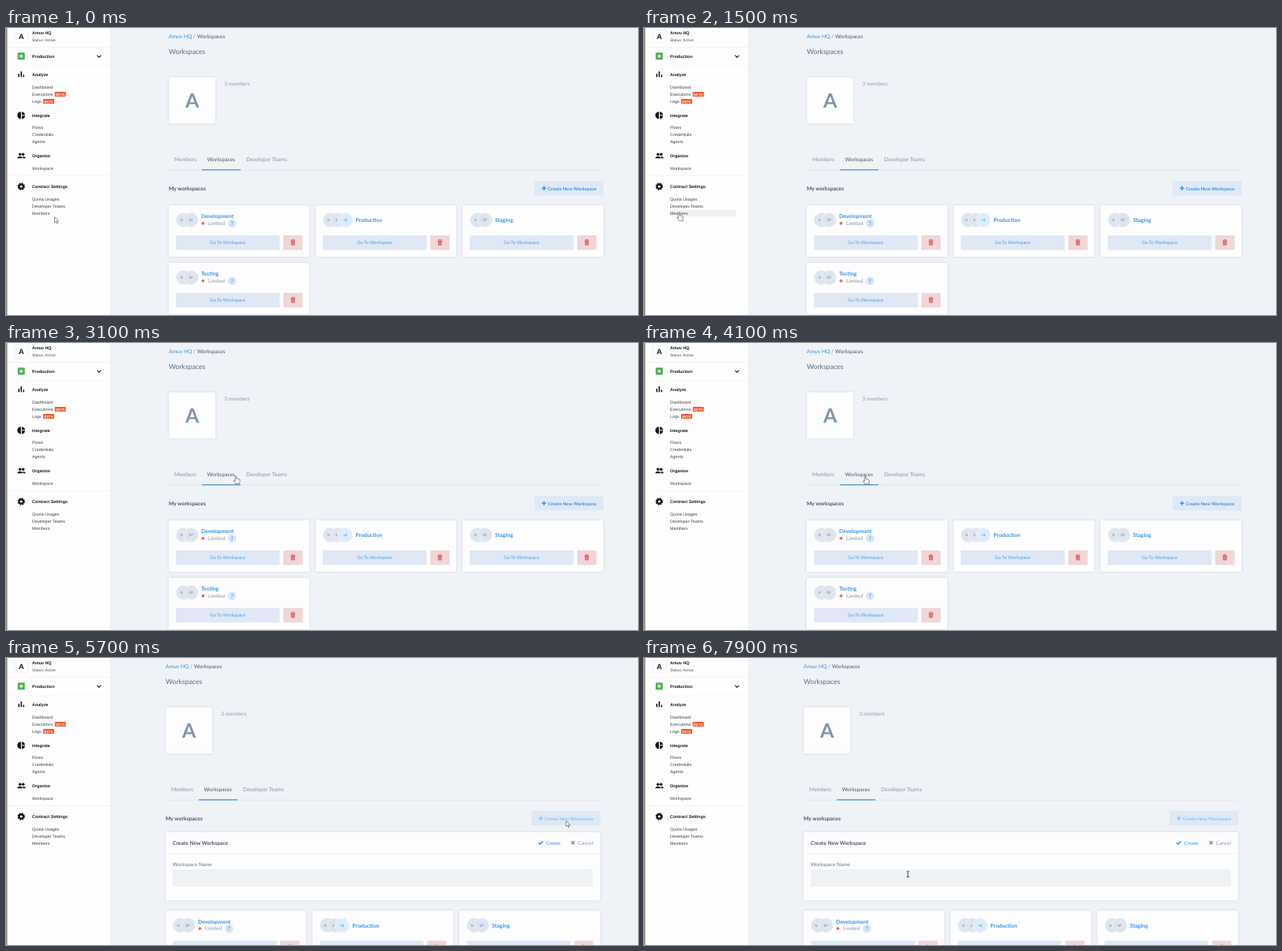
Recreate the animation shown at these times as an HTML page. Size 800 by 364 pixels, loop 8 s.

```html
<!DOCTYPE html>
<html lang="en">
<head>
<meta charset="utf-8">
<title>Workspaces</title>
<style>
  html, body { margin: 0; width: 100%; height: 100%; overflow: hidden; background: #eff2f6; }
  svg { display: block; width: 100vw; height: 100vh; }
  text { font-family: Lato, "Open Sans", sans-serif; text-rendering: geometricPrecision; white-space: pre; }
  .side text { font-family: "Liberation Sans", Arial, sans-serif; }
  .card { filter: drop-shadow(0 .6px 1.6px rgba(70, 90, 120, .17)); }
</style>
</head>
<body>
<svg id="stage" viewBox="0 0 800 364" preserveAspectRatio="none"></svg>
<script>
const BLUE = '#3493ea', SLATE = '#8795aa', DARK = '#4c5667';

const text = (x, y, s, size, fill, bold, anchor = 'start') =>
  `<text x="${x}" y="${y}" font-size="${size}" fill="${fill}" font-weight="${bold ? 700 : 400}" text-anchor="${anchor}">${s}</text>`;
const rect = (x, y, w, h, fill, r = 0, extra = '') =>
  `<rect x="${x}" y="${y}" width="${w}" height="${h}" rx="${r}" fill="${fill}" ${extra}/>`;
const circle = (x, y, r, fill, extra = '') => `<circle cx="${x}" cy="${y}" r="${r}" fill="${fill}" ${extra}/>`;
const path = (d, fill, extra = '') => `<path d="${d}" fill="${fill}" ${extra}/>`;
const line = (d, color, w) => path(d, 'none', `stroke="${color}" stroke-width="${w}"`);
const group = (x, y, body, extra = '') => `<g transform="translate(${x} ${y})" ${extra}>${body}</g>`;

// Sidebar
const badge = (x, y) => rect(x, y, 14, 6, '#f2592f', .8) + text(x + 7, y + 4.6, 'BETA', 4.3, '#ffe3da', true, 'middle');

function sidebar() {
  const heads = [[7.9, 'Amuv HQ'], [37.6, 'Production'], [60.6, 'Analyze'], [112.6, 'Integrate'],
    [164.4, 'Organize'], [203, 'Contract Settings']];
  const items = [[76.5, 'Dashboard'], [85.7, 'Executions'], [94.7, 'Logs'], [128.4, 'Flows'],
    [137.4, 'Credentials'], [146.4, 'Agents'], [180.2, 'Workspace'], [218.9, 'Quota Usages'],
    [227.9, 'Developer Teams'], [236.9, 'Members']];
  const icons =
    rect(12, 3, 15, 15, '#fff', 1.5, 'class="card"') + text(19.5, 13.7, 'A', 9.4, '#15181d', true, 'middle') +
    rect(14.8, 31.2, 9, 9, '#4fae55', .8) + circle(19.3, 35.7, 2.3, '#a9dcab') + circle(19.3, 35.7, 1, '#fff') +
    line('M115.3 34.6L117.8 37.1L120.3 34.6', '#222', 1.2) +
    line('M16.3 62.3V58M19.3 62.3V55M22.3 62.3V59.6', '#111', 1.5) +
    path('M18.9 106.2A4.6 4.6 0 0 0 18.9 115.4ZM20 106.2V110.3H24.1A4.6 4.6 0 0 0 20 106.2ZM20 111.3H24.1A4.6 4.6 0 0 1 20 115.4Z', '#111') +
    circle(17.7, 160.3, 1.8, '#111') + circle(21.7, 160.3, 1.8, '#111') +
    path('M14.3 165.3Q14.5 162.8 17.7 162.8T21 165.3ZM21.7 165.3Q21.8 163.8 20.9 162.9Q24.6 162.7 24.8 165.3Z', '#111') +
    circle(19.3, 201, 2.7, 'none', 'stroke="#111" stroke-width="2.2"') +
    circle(19.3, 201, 4, 'none', 'stroke="#111" stroke-width="1.4" stroke-dasharray="1.8 1.342"');
  return '<g class="side">' + rect(0, 0, 132, 364, '#fefefe') + rect(0, 0, 1.6, 364, '#8d887e') +
    line('M132.2 0V364', '#e6eaef', .6) +
    line('M1.6 24.5H132M1.6 48H132M1.6 187.5H132', '#eef0f3', .7) +
    rect(33, 230.8, 83.5, 8.4, '#f0f0f1', 0, 'id="row"') + icons +
    heads.map(([y, s]) => text(33, y, s, 5.4, '#17191d', true)).join('') +
    text(33, 16.8, 'Status: Active', 4.9, '#4b4e54') +
    items.map(([y, s]) => text(33, y, s, 5.4, '#404349')).join('') +
    badge(61.7, 81) + badge(47, 90) + '</g>';
}

// Workspace cards
const avatar = (x, s, dx = 0, fill = '#dfe5ee', ink = '#8fa0b7') =>
  circle(x, 18.5, 9.2, fill, 'stroke="#f4f6f9" stroke-width=".5"') + text(x + dx, 20.1, s, 4.5, ink, true, 'middle');

const trash = path('M-3-3.1H-1.2L-.8-3.8H.8L1.2-3.1H3V-2.3H-3ZM-2.6-1.8H2.6L2.2 3.8H-2.2Z', '#d9595d') +
  line('M-1-.8V2.8M0-.8V2.8M1-.8V2.8', '#f0cfd0', .4);

function card(x, y, name, size, { limited, extra } = {}) {
  let body = rect(0, 0, 178, 65, '#fdfdfe', 1.5, 'class="card"') + avatar(18.5, 'N', -2.2);
  body += extra
    ? avatar(28.2, 'E', -1.6) + avatar(37.6, '+1', 0, '#dcecfc', BLUE)
    : avatar(28.2, 'EP');
  body += text(limited ? 41 : extra ? 50.5 : 41, limited ? 16.2 : 21, name, size, BLUE, true);
  if (limited) {
    body += circle(43.4, 22.7, 1.9, '#ee6d58') + text(50, 24.8, 'Limited', 6.5, SLATE) +
      circle(80.2, 22.7, 5.2, '#d2e6fb') + text(80.2, 24.9, '?', 6.2, BLUE, true, 'middle');
  }
  body += rect(9, 38, 131.5, 18.4, '#dfe8f4', 1.2) + text(74.7, 49.2, 'Go To Workspace', 5.85, '#4b9fea', false, 'middle') +
    rect(145, 38, 24.5, 18.4, '#f0d6d7', 1.2) + group(157.2, 46.8, trash);
  return group(x, y, body);
}

function form() {
  return '<g id="form">' + rect(206, 221, 550, 86.5, '#fdfdfe', 1.5, 'class="card"') +
    line('M206 248.3H756', '#f0f2f5', .8) +
    text(215, 237.4, 'Create New Workspace', 6.7, DARK, true) +
    line('M678.2 234.4L680 236.2L683.6 232.2', BLUE, 1.5) + text(687.6, 236.6, 'Create', 6.3, BLUE) +
    line('M719.7 232.3L723.7 236.3M723.7 232.3L719.7 236.3', '#7d8a9d', 1.4) + text(727.8, 236.6, 'Cancel', 6.5, SLATE) +
    text(215, 264.2, 'Workspace Name', 6.4, '#677386') +
    rect(215, 268, 532, 22, '#eff2f5', 1.5) +
    rect(222.7, 275, .8, 8, '#3a4350', 0, 'id="caret"') + '</g>';
}

function page() {
  return '<g id="main">' +
    text(206, 13.3, 'Amuv HQ', 6.75, BLUE) + text(237, 13.3, '/', 6.75, SLATE) + text(242, 13.3, 'Workspaces', 6.65, DARK) +
    text(206, 32.6, 'Workspaces', 8.7, '#5f6b7e') +
    rect(206.3, 62.5, 58.7, 58.5, '#fdfdfe', 1.5, 'class="card"') + text(235.6, 101.4, 'A', 25, '#8093b0', true, 'middle') +
    text(276.3, 72.8, '3 members', 6.6, '#8f9db1') +
    line('M206 180.2H756', '#dfe4eb', .7) + rect(248, 179.2, 49, 1.3, '#4a93e0') +
    text(213, 168.8, 'Members', 6.75, SLATE) + text(254.5, 168.8, 'Workspaces', 6.65, DARK) +
    text(304, 168.8, 'Developer Teams', 6.88, SLATE) +
    text(206, 205.7, 'My workspaces', 6.8, DARK, true) +
    '<g id="add">' + rect(669.3, 194, 87, 18.6, '#dfe9f5', 1.2, 'id="addBox"') +
    line('M678.3 203.3H683.7M681 200.6V206', BLUE, 1.5) + text(686, 205.6, 'Create New Workspace', 5.85, BLUE, true) + '</g>' +
    form() + '<g id="cards">' +
    card(206, 225, 'Development', 6.88, { limited: true }) +
    card(392, 225, 'Production', 6.85, { extra: true }) +
    card(578, 225, 'Staging', 7) +
    card(206, 298, 'Testing', 7, { limited: true }) + '</g></g>';
}

const outline = 'stroke="#4a4d52" stroke-width=".65" stroke-linejoin="round"';
const pointers = '<g id="pointer">' +
  path('M0 0V7.2L1.7 5.7L2.9 8.4L4.1 7.9L2.9 5.3H5.1Z', '#fff', outline + ' id="arrow"') +
  path('M-1.5 0Q-.7-1.5 .1 0V3L3.4 3.7Q4.6 4.1 4.5 5.5L3.8 9.4H-.8L-3.4 5.7Q-3 4.4-1.5 5.6Z', '#fff', outline + ' id="hand"') +
  path('M-1.9-3.7Q0-3.7 0-2.8Q0-3.7 1.9-3.7M0-2.8V2.8M-1.9 3.7Q0 3.7 0 2.8Q0 3.7 1.9 3.7', 'none', 'stroke="#2c2f34" stroke-width=".9" id="beam"') +
  '</g>';

document.getElementById('stage').innerHTML = page() + sidebar() + pointers;

// Pointer route: time, x, y
const LOOP = 8000, OPEN = 5700, FOCUS = 7400, BLINK = 500;
const route = [
  [0, 61.5, 239.5], [900, 47, 236.5], [1200, 41, 235.5], [1500, 45.2, 235], [1600, 45.2, 235],
  [2350, 279, 168.5], [2500, 268, 168], [2750, 219.5, 167], [3100, 291.7, 169], [3500, 257, 169.5],
  [3850, 276, 169.5], [4100, 280.7, 169.5], [4400, 280.7, 169.5], [5300, 709, 206.5], [6200, 709, 206.5],
  [6500, 690, 178], [6800, 520, 213], [7100, 343, 273], [7200, 344, 272.8], [7400, 334, 274.3], [8000, 334, 274.3]
];

function slope(i, k) {
  const a = route[i - 1], b = route[i], c = route[i + 1];
  if (!a || !c || (b[k] - a[k]) * (c[k] - b[k]) <= 0) return 0;
  return (c[k] - a[k]) / (c[0] - a[0]);
}

function along(t, k) {
  const i = Math.max(0, route.findIndex(p => p[0] > t) - 1);
  const a = route[i], b = route[i + 1], d = b[0] - a[0], u = (t - a[0]) / d, v = 1 - u;
  return v * v * (1 + 2 * u) * a[k] + u * u * (3 - 2 * u) * b[k] +
    d * u * v * (v * slope(i, k) - u * slope(i + 1, k));
}

const el = id => document.getElementById(id);
const show = (id, on) => { el(id).style.display = on ? '' : 'none'; };

function draw(now) {
  const t = Math.floor(now % LOOP / 100) * 100;
  const x = along(t, 1), y = along(t, 2), open = t >= OPEN;
  const over = (l, top, r, b) => x >= l && x <= r && y >= top && y <= b;
  const row = over(33, 230.5, 116, 239), add = !open && over(669, 194, 756, 212);
  const hand = row || add || over(206, 158, 360, 181);
  const beam = open && over(211, 268, 743, 290);

  el('main').setAttribute('transform', `translate(${open ? -4 : 0} 0)`);
  el('cards').setAttribute('transform', `translate(0 ${open ? 95.5 : 0})`);
  el('add').setAttribute('opacity', open ? .5 : 1);
  el('addBox').setAttribute('fill', add || open ? '#d0e1f4' : '#dfe9f5');
  el('pointer').setAttribute('transform', `translate(${x.toFixed(2)} ${y.toFixed(2)})`);
  show('form', open);
  show('row', row);
  show('caret', t >= FOCUS && t < FOCUS + BLINK);
  show('arrow', !hand && !beam);
  show('hand', hand);
  show('beam', beam);
}

const start = performance.now();
function tick() {
  draw(performance.now() - start);
  requestAnimationFrame(tick);
}
tick();
</script>
</body>
</html>
```
